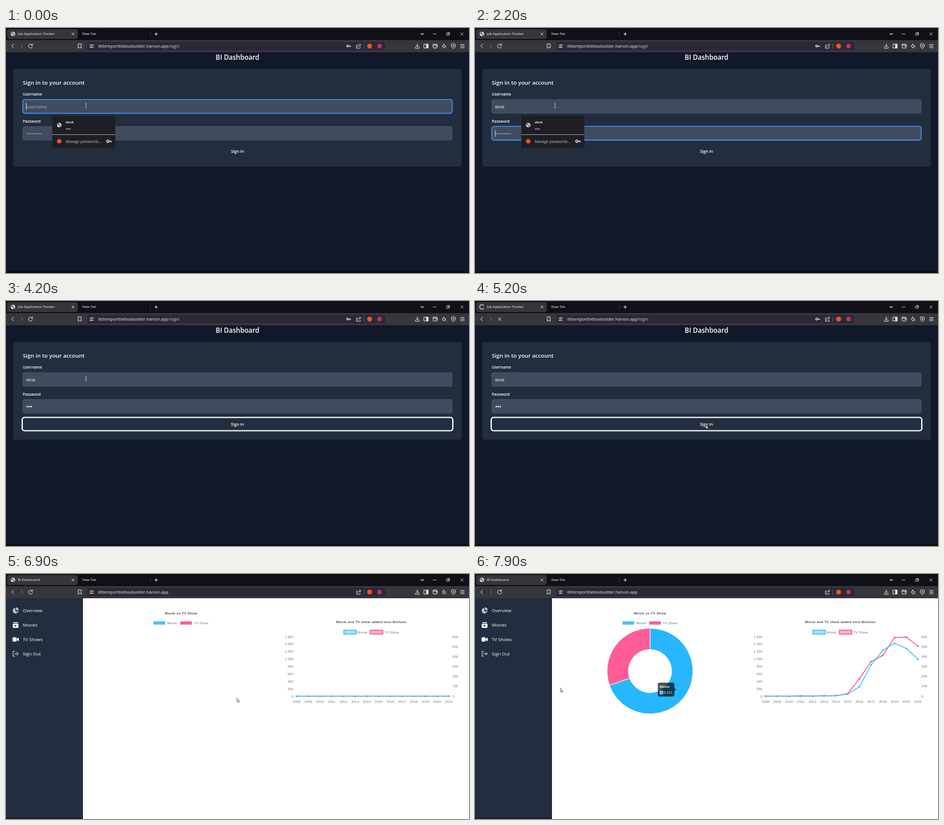
Animation, 800 px wide and 424 px high, one loop 8000 ms. Source, as an HTML page:

```html
<!DOCTYPE html>
<html lang="en">
<head>
<meta charset="utf-8">
<title>BI Dashboard</title>
<style>
html, body { margin: 0; width: 100%; height: 100%; overflow: hidden; background: #11182a; }
svg { display: block; width: 800px; height: 424px; }
text { font-family: "Open Sans", "Noto Sans", sans-serif; fill: #fff; white-space: pre; }
.tab { font-size: 6px; }
.url { font-size: 7.15px; fill: #ececf0; }
.bold { font-weight: 600; }
.label { font-size: 6.7px; font-weight: 600; }
.input { font-size: 7.5px; }
.hint { fill: #a7afbc; }
.nav text { font-size: 7.8px; font-weight: 500; }
.chart text { font: 6px "Liberation Sans", Arial, sans-serif; fill: #777; }
.chart .title { font-weight: bold; font-size: 6.1px; letter-spacing: .17px; fill: #555; text-anchor: middle; }
.chart .key { font-size: 6.1px; letter-spacing: .1px; }
.chart .tip text { fill: #fff; }
.line { fill: none; stroke: #e4e4e8; stroke-width: 1; stroke-linecap: round; stroke-linejoin: round; }
.field rect { fill: #404c5e; stroke: #505c6d; stroke-width: .8; }
.focus { fill: none; stroke: #3f8cf7; stroke-width: 1.6; }
.caret { stroke: #fff; stroke-width: .8; }
</style>
</head>
<body>
<svg viewBox="0 0 800 424">
  <defs>
    <g id="globe">
      <circle r="3.8" fill="#d8d9dd"/>
      <path d="M-2.8-1.6L-.8-2.6 .8-1.4-.4 0-1.8.2ZM.4.8L2.6.2 1.6 2.4.2 2.8Z" fill="#34353b"/>
    </g>
    <g id="passkey" fill="none" stroke="#e4e4e8">
      <circle r="1.9" cx="-2" stroke-width="1.5"/>
      <path d="M0 0H4.4M3.4 0V2" stroke-width="1.4"/>
    </g>
    <g id="dots"><circle r="1.15"/></g>
  </defs>

  <!-- login page -->
  <g data-on="0 6900">
    <rect y="42" width="800" height="382" fill="#11182a"/>
    <rect y="421" width="800" height="3" fill="#0a0d19"/>
    <text class="bold" x="400" y="55.2" font-size="11.6" text-anchor="middle">BI Dashboard</text>
    <rect x="12.5" y="71" width="775" height="169" rx="4" fill="#222e3e"/>
    <text class="bold" x="29" y="98.4" font-size="9.7">Sign in to your account</text>
    <text class="label" x="29" y="117.3">Username</text>
    <text class="label" x="29" y="164">Password</text>
    <g class="field">
      <rect x="29" y="124" width="742" height="23.5" rx="3"/>
      <rect x="29" y="170.5" width="742" height="23.5" rx="3"/>
    </g>
    <rect class="focus" data-on="0 2000" x="29" y="123.8" width="742" height="23.8" rx="3.5"/>
    <rect class="focus" data-on="2000 4000" x="29" y="170.3" width="742" height="23.8" rx="3.5"/>
    <text class="input hint" data-on="0 1000" x="35.3" y="138.7">username</text>
    <text class="input" id="name" x="34.6" y="138.7"></text>
    <g id="hintDots" class="hint" data-on="0 2700" fill="#a7afbc"></g>
    <g id="passDots" fill="#fff"></g>
    <path class="caret" id="caret" d="M0 0V12"/>
    <rect data-on="4000 6900" x="28" y="201.5" width="744" height="23" rx="4" fill="#222e3e" stroke="#fff" stroke-width="2.2"/>
    <text class="bold" x="400" y="216" font-size="7.1" text-anchor="middle">Sign in</text>

    <g data-on="0 2600">
      <path d="M88 152.5L91.5 149 95 152.5Z" fill="#1d1f24"/>
      <rect x="80" y="152" width="109" height="56" rx="2" fill="#1d1f24"/>
      <use href="#globe" x="92" y="168"/>
      <text class="bold" x="103.3" y="164.8" font-size="6.1">desk</text>
      <g fill="#d6d6da"><circle cx="105" cy="174.7" r="1"/><circle cx="107.8" cy="174.7" r="1"/><circle cx="110.6" cy="174.7" r="1"/></g>
      <path d="M80 184.5H189" stroke="#a9abb0" stroke-width=".9"/>
      <circle cx="92" cy="196" r="3.8" fill="#f4532c"/>
      <text x="103.3" y="198.5" font-size="6.3" style="fill:#c2c3c8">Manage passwords...</text>
      <use href="#passkey" x="178" y="196"/>
    </g>
  </g>

  <!-- dashboard page -->
  <g data-on="6900 8000">
    <rect y="42" width="800" height="382" fill="#fff"/>
    <rect y="42" width="133" height="382" fill="#222e3f"/>
    <rect y="421" width="133" height="3" fill="#211d38"/>
    <g class="nav">
      <path d="M16 58.5A5 5 0 1 0 20 67L16 63.5Z" fill="#b9c0ca"/>
      <path d="M17.2 57.8A5 5 0 0 1 22 62.6H17.2ZM18 64H22A5 5 0 0 1 20.8 66.4Z" fill="#b9c0ca"/>
      <path d="M12.5 83.5H20.8V85H12.5Z" fill="#fff"/>
      <rect x="11.7" y="86" width="9.8" height="7.2" rx="1.2" fill="#fff"/>
      <path d="M15.2 87.6V91.6L18.8 89.6Z" fill="#222e3f"/>
      <rect x="11.3" y="109.5" width="7" height="7.6" rx="1.4" fill="#fff"/>
      <path d="M18.8 112L22 110V116.6L18.8 114.6Z" fill="#fff"/>
      <path class="line" d="M15 133.8H12.2V142.2H15M15 138H21M18.6 135.4L21.2 138 18.6 140.6" stroke-width="1.3"/>
      <text x="29" y="66">Overview</text>
      <text x="29" y="91">Movies</text>
      <text x="29" y="116">TV Shows</text>
      <text x="29" y="141">Sign Out</text>
    </g>
    <g class="chart">
      <text class="title" x="302.5" y="69.6">Movie vs TV Show</text>
      <rect x="255" y="82" width="20" height="5.6" fill="#47c1ff"/>
      <rect x="301" y="82" width="20" height="5.6" fill="#ff5c98"/>
      <text class="key" x="278.4" y="86.8">Movie</text>
      <text class="key" x="324.2" y="86.8">TV Show</text>
      <path id="movieArc" stroke="#fff" stroke-width="1"/>
      <path id="showArc" fill="#ff5c98" stroke="#fff" stroke-width="1"/>

      <text class="title" x="631" y="85.3">Movie and TV show added onto Brolvan</text>
      <rect x="583.8" y="97.3" width="21.4" height="6.6" fill="#a9e0fb" stroke="#40bdf5" stroke-width="1.6"/>
      <rect x="629.6" y="97.3" width="21.4" height="6.6" fill="#ffb3d1" stroke="#f4568f" stroke-width="1.6"/>
      <text class="key" x="607.6" y="102.7">Movie</text>
      <text class="key" x="653.8" y="102.7">TV Show</text>
      <g id="ticks"></g>
      <g id="plot"></g>

      <g class="tip" id="tip">
        <path d="M319 188H341.5Q344.5 188 344.5 191V197.4L347.6 200 344.5 202.6V209Q344.5 212 341.5 212H319Q316 212 316 209V191Q316 188 319 188Z" fill="#000" fill-opacity=".8"/>
        <text x="319" y="196.6" font-weight="bold" style="font-weight:bold">Movie</text>
        <rect x="319.3" y="202.4" width="5.4" height="5.4" fill="#47c1ff" stroke="#fff" stroke-width=".7"/>
        <text x="326" y="207.2">6,131</text>
      </g>
    </g>
  </g>

  <!-- browser bars -->
  <rect width="800" height="21" fill="#101116"/>
  <rect x="2" y="2" width="122" height="17" rx="4" fill="#35363c"/>
  <rect y="21" width="800" height="21" fill="#36373c"/>
  <rect x="139.5" y="23" width="517" height="16.5" rx="4" fill="#2b2a32" stroke="#40346a" stroke-width="1"/>
  <use href="#globe" x="12" y="10.3" data-on="0 4700"/>
  <use href="#globe" x="12" y="10.3" data-on="6900 8000"/>
  <path id="spinner" class="line" data-on="4700 6900" style="stroke-width:1.3"/>
  <text class="tab" x="20.4" y="12.4" data-on="0 6900">Job Application Tracker</text>
  <text class="tab" x="20.4" y="12.4" data-on="6900 8000">BI Dashboard</text>
  <text class="tab" x="132" y="12.4">New Tab</text>
  <path d="M249.5 6V15" stroke="#34353b"/>
  <g class="line">
    <path d="M114 8.6L117.4 12M117.4 8.6L114 12M257 10.5H262M259.5 8V13"/>
    <path d="M717 9.4L719.2 11.6 721.4 9.4" stroke-width="1.2"/>
    <path d="M738 10.3H743M761.6 9H765.2V12.6H761.6ZM763 9V7.8H766.4V11.2H765.4M785.6 8.2L790 12.6M790 8.2L785.6 12.6" stroke-width=".8"/>
    <path d="M13 28L10 31.2 13 34.4"/>
    <path d="M26 28L29 31.2 26 34.4" stroke="#77787e"/>
    <path data-on="0 4700" d="M45.4 29.4A3.5 3.5 0 1 0 45.9 32M45.8 27.4V29.8H43.4"/>
    <path data-on="4700 6900" d="M40 28.8L45 33.8M45 28.8L40 33.8"/>
    <path data-on="6900 8000" d="M45.4 29.4A3.5 3.5 0 1 0 45.9 32M45.8 27.4V29.8H43.4"/>
    <path d="M125.2 27.6H130V35L127.6 33 125.2 35Z"/>
    <path d="M144.6 29.5H147M150 29.5H151.4M144.6 33.2H146M149 33.2H151.4"/>
    <circle cx="148.5" cy="29.5" r="1.1"/><circle cx="147.4" cy="33.2" r="1.1"/>
    <path d="M607.4 29.4H605.6V35H612V33M607.8 33Q608 29.2 612.6 29.2M610.8 27L613 29.2 610.8 31.4" stroke-width=".9"/>
    <path d="M618.3 27V35.5" stroke="#66676d" stroke-width=".8"/>
    <path d="M710.7 27.4V32.4M708.6 30.6L710.7 32.6 712.8 30.6M707.4 33V35H714V33"/>
    <path d="M722.4 28H729.4V34.6H722.4Z"/>
    <path d="M726.6 28H729.4V34.6H726.6Z" fill="#e4e4e8"/>
    <rect x="738" y="28" width="7.2" height="6.6" rx="1"/>
    <path d="M738 29.8H745M742.4 31.6H745"/>
    <path d="M756.4 27.6L757.6 30.2 760.2 31.3 757.6 32.4 756.4 35 755.2 32.4 753.4 31.3 755.2 30.2ZM759.6 33.6L760.6 34.8"/>
    <path d="M773 27.2L776.4 28.4V31.6Q776 34 773 35.4 770 34 769.6 31.6V28.4Z"/>
    <circle cx="773" cy="31" r="1"/>
    <path d="M785.4 28.6H791.8M785.4 31.3H791.8M785.4 34H791.8"/>
  </g>
  <use href="#passkey" transform="translate(592 31.3) scale(.85)" data-on="0 6900"/>
  <circle cx="628.3" cy="31.2" r="4.2" fill="#f4532c"/>
  <circle cx="645.5" cy="31.2" r="3.9" fill="#b8346c"/>
  <text class="url" x="159.2" y="33.7">littlereporttileboxbuilder.harvon.app<tspan data-on="0 6900" style="fill:#c8c8d0">/login</tspan></text>

  <!-- pointers -->
  <path data-on="0 4700" d="M136.9 131H139.3M138.1 131V138M136.9 138H139.3" fill="none" stroke="#d5d9df" stroke-width=".8"/>
  <path id="arrow" data-on="4700 8000" d="M0 0V6.8L1.6 5.4 2.7 7.8 3.7 7.3 2.6 5H4.6Z" fill="#fff" stroke="#222" stroke-width=".6"/>
</svg>
<script>
const LOOP = 8000, LOADED = 6903;
const USER = 'desk';
const USER_KEYS = [1000, 1100, 1300, 1400], PASS_KEYS = [2700, 3000, 3100];
const MOVIES = [1, 2, 1, 13, 3, 6, 19, 56, 253, 839, 1237, 1424, 1284, 993];
const SHOWS = [1, 0, 0, 0, 0, 5, 5, 26, 176, 349, 412, 592, 595, 505];
const SHARE = 6131 / 8807;
const BASE = 211.5, TALL = 103, LEFT = 502, STEP = 20.27;

const $ = id => document.getElementById(id);
const set = (el, attrs) => { for (const k in attrs) el.setAttribute(k, attrs[k]); return el; };
const make = (parent, tag, attrs) =>
  parent.appendChild(set(document.createElementNS('http://www.w3.org/2000/svg', tag), attrs));
const clamp = x => Math.min(1, Math.max(0, x));
const ramp = (t, from, to) => clamp((t - from) / (to - from));
const smooth = x => x * x * (3 - 2 * x);
const mix = (a, b, p) => a + (b - a) * p;
const outQuart = p => 1 - (1 - p) ** 4;
const typed = (keys, t) => keys.filter(k => t >= k).length;

const timed = [...document.querySelectorAll('[data-on]')].map(el => {
  const [from, to] = el.dataset.on.split(' ').map(Number);
  return { el, from, to };
});

for (let i = 0; i < 8; i++) make($('hintDots'), 'circle', { cx: 36.6 + i * 3.45, cy: 183, r: 1.05 });
const passDots = PASS_KEYS.map((_, i) => make($('passDots'), 'circle', { cx: 36.7 + i * 3.4, cy: 182.8, r: 1.25 }));

function tick(x, y, value, anchor) {
  make($('ticks'), 'text', { x, y: y + 2.1, 'text-anchor': anchor }).textContent = value;
}
for (let i = 0; i <= 8; i++) {
  const value = String(i * 200).replace(/(\d)(\d{3})$/, '$1 $2');
  tick(496.5, BASE - i * TALL / 8, value, 'end');
}
for (let i = 0; i <= 6; i++) tick(771.3, BASE - i * TALL / 6, i * 100, 'start');
MOVIES.forEach((_, i) => tick(LEFT + i * STEP, 220.8, 2008 + i, 'middle'));

function series(data, max, color) {
  const line = make($('plot'), 'path', { fill: 'none', stroke: color, 'stroke-width': 1.5, 'stroke-linejoin': 'round' });
  const marks = data.map((_, i) => make($('plot'), 'circle', { cx: LEFT + i * STEP, r: 1.6, fill: color }));
  return grow => {
    const ys = data.map(v => BASE - v / max * TALL * grow);
    set(line, { d: 'M' + ys.map((y, i) => `${LEFT + i * STEP} ${y}`).join('L') });
    marks.forEach((m, i) => set(m, { cy: ys[i] }));
  };
}
const drawShows = series(SHOWS, 600, '#f9598f');
const drawMovies = series(MOVIES, 1600, '#47bff5');

// Angles are turns, clockwise from the top.
function polar(cx, cy, r, turn) {
  const a = turn * 2 * Math.PI;
  return `${cx + r * Math.sin(a)} ${cy - r * Math.cos(a)}`;
}
function ring(from, to) {
  const end = Math.max(from + 1e-4, Math.min(to, from + .9999));
  const big = end - from > .5 ? 1 : 0;
  const p = (r, turn) => polar(302.4, 168, r, turn);
  return `M${p(74.2, from)}A74.2 74.2 0 ${big} 1 ${p(74.2, end)}L${p(37.3, end)}A37.3 37.3 0 ${big} 0 ${p(37.3, from)}Z`;
}

function drawForm(t) {
  const letters = typed(USER_KEYS, t), dots = typed(PASS_KEYS, t);
  const name = $('name');
  name.textContent = USER.slice(0, letters);
  passDots.forEach((d, i) => { d.style.display = i < dots ? '' : 'none'; });
  const inPass = t >= 2000;
  const x = inPass ? 35 + dots * 3.4 : 35 + (letters ? name.getComputedTextLength() + .3 : 0);
  set($('caret'), { transform: `translate(${x} ${inPass ? 176.3 : 129.8})` });
  $('caret').style.display = t < 4000 && !(t >= 500 && t < 1000) ? '' : 'none';
}

function drawSpinner(t) {
  const s = (t - 5200) / 1600;
  const half = (200 + 70 * Math.cos(s * 3 * Math.PI)) / 720;
  const mid = .75 + s;
  set($('spinner'), {
    d: `M${polar(12, 10.3, 3.9, mid - half)}A3.9 3.9 0 ${half > .25 ? 1 : 0} 1 ${polar(12, 10.3, 3.9, mid + half)}`
  });
}

function drawCharts(t) {
  const turn = outQuart(ramp(t, LOADED, LOADED + 1000));
  const grow = outQuart(ramp(t, LOADED + 27, LOADED + 1027));
  const hover = smooth(ramp(t, 7560, 7760));
  set($('movieArc'), {
    d: ring(0, SHARE * turn),
    fill: `rgb(${mix(71, 40, hover)},${mix(193, 182, hover)},255)`
  });
  set($('showArc'), { d: ring(SHARE * turn, turn) });
  set($('tip'), { opacity: hover * .85 });
  drawShows(grow);
  drawMovies(grow);
}

function drawArrow(t) {
  const arrive = smooth(ramp(t, 4700, 4900)), leave = smooth(ramp(t, 7380, 7880));
  const x = mix(mix(138, 399, arrive), 147.5, leave);
  const y = mix(mix(134, 214.5, arrive), 197.3, leave);
  set($('arrow'), { transform: `translate(${x} ${y})` });
}

function draw(t) {
  for (const { el, from, to } of timed) el.style.display = t >= from && t < to ? '' : 'none';
  if (t < LOADED) drawForm(t);
  drawSpinner(t);
  drawCharts(t);
  drawArrow(t);
}

const start = performance.now();
function frame() {
  draw((performance.now() - start) % LOOP);
  requestAnimationFrame(frame);
}
frame();
</script>
</body>
</html>
```
